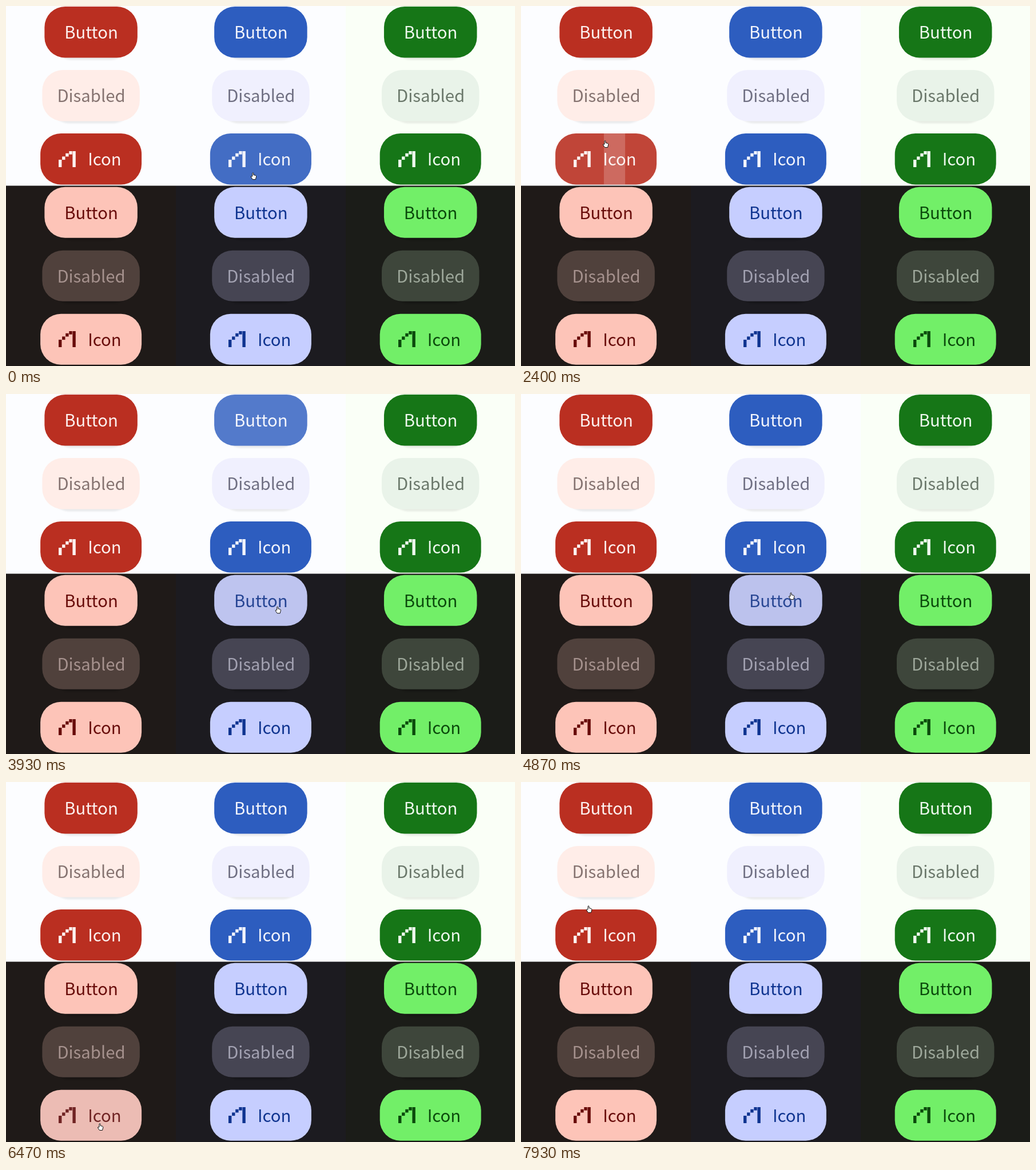
An HTML page that plays this animation: 890x630 px, repeating every 8000 ms.

```html
<!DOCTYPE html>
<html lang="en">
<head>
<meta charset="utf-8">
<title>Button states</title>
<style>
html, body { margin: 0; width: 100%; height: 100%; overflow: hidden; background: #1c1b20; }
svg { display: block; width: 890px; height: 630px; }
text { font: 29.3px "Noto Sans CJK SC", "Noto Sans CJK JP", "Noto Sans CJK", "Noto Sans", sans-serif; }
</style>
</head>
<body>
<svg id="stage" viewBox="0 0 890 630">
  <defs>
    <filter id="soft" x="-10%" y="-10%" width="120%" height="130%"><feGaussianBlur stdDeviation="1.5"/></filter>
    <g id="steps"></g>
  </defs>
  <g id="scene"></g>
  <g id="cursor" stroke-linejoin="round">
    <path id="arrow" fill="#fff" stroke="#111" d="M.5 .5V16.500L4.200 13L7 19.500L9.700 18.300L7 12H11.700Z"/>
    <path id="hand" fill="#fff" stroke="#111" d="M-1 7V1.500Q0 -.2 1 1.500V4.500L5 5.500Q6 6 5.700 8L4.500 12.500H-.5L-3.500 8Q-3.500 6.200 -2 7Z"/>
  </g>
</svg>
<script>
const NS = 'http://www.w3.org/2000/svg';
const LOOP = 8000, STEP = 1000 / 15, TRAVEL = 200, GROW = 300, FADE = 250;
const COL = 296.8, ROW = 111, CENTER = 148.6, RADIUS = 36;
const $ = id => document.getElementById(id);
const scene = $('scene');

function add(parent, tag, attrs, text) {
  const el = document.createElementNS(NS, tag);
  for (const k in attrs) el.setAttribute(k, attrs[k]);
  if (text) el.textContent = text;
  parent.appendChild(el);
  return el;
}

const theme = (y, h, overlay, hover, ripple, shade, cols) => ({ y, h, overlay, hover, ripple, shade, cols });
const colors = (bg, fill, ink, off, offInk) => ({ bg, fill, ink, off, offInk });
const themes = [
  theme(0, 89.5, '#eee', 0.115, '#fff', 0.07, [
    colors('#fcfdff', '#ba2f21', '#fdf1ef', '#ffede8', '#857370'),
    colors('#fcfdff', '#2d5dbf', '#f2f4fc', '#f0f0fe', '#6f6f82'),
    colors('#fafff7', '#167617', '#eef8ee', '#e9f3e9', '#6a776a')]),
  theme(315.8, 88.9, '#9696a0', 0.17, '#9696a0', 0.2, [
    colors('#1f1a18', '#fdc4b8', '#680c0a', '#50413c', '#a6928e'),
    colors('#1c1b20', '#c6ceff', '#0f3490', '#464553', '#a3a2b2'),
    colors('#1b1c18', '#72ef68', '#0b4a0c', '#3e463b', '#9ea89b')])
];
const widths = { Button: 162.5, Disabled: 170.5, Icon: 177 };
const buttons = [];

// Small staircase: tall first and last bars, short treads between
for (let i = 0; i < 5; i++) {
  const height = i === 0 ? 13 : i === 4 ? 28 : 5.7;
  add($('steps'), 'rect', { x: 92 + 6.1 * i, y: Math.max(254, 269 - 5.6 * i), width: 5.4, height });
}

function drawButton(style, col, i, name, row) {
  const off = name === 'Disabled', ink = off ? col.offInk : col.ink;
  const width = widths[name], height = style.h;
  const x = CENTER - width / 2 + i * COL, y = 1 + row * ROW + style.y;
  const shape = { x, y, width, height, rx: RADIUS };
  add(scene, 'rect', { ...shape, x: x + 12, y: y + 4, width: width - 24,
    fill: '#000', opacity: style.shade, filter: 'url(#soft)' });
  add(scene, 'rect', { ...shape, fill: off ? col.off : col.fill });

  const icon = name === 'Icon';
  if (icon) add(scene, 'use', { href: '#steps', fill: ink,
    transform: `translate(${Math.round(i * COL)} ${Math.floor(style.y)})` });
  add(scene, 'text', { x: (icon ? 172.4 : 149) + i * COL, y: y + 56.3, fill: ink, 'text-anchor': 'middle' }, name);
  if (off) return;

  const id = 'clip' + buttons.length;
  add(add(scene, 'clipPath', { id }), 'rect', shape);
  const hover = add(scene, 'rect', { ...shape, fill: style.overlay, opacity: 0 });
  const layer = add(scene, 'g', { 'clip-path': `url(#${id})` });
  const ripple = add(layer, 'rect', { y, height, fill: style.ripple, opacity: 0 });
  buttons.push({ x, y, w: width, h: height, hover, ripple, level: style.hover });
}

for (const style of themes) {
  style.cols.forEach((col, i) => add(scene, 'rect', {
    x: i * 297, y: style.y && 314.5, width: 297, height: 316, fill: col.bg }));
  style.cols.forEach((col, i) =>
    Object.keys(widths).forEach((name, row) => drawButton(style, col, i, name, row)));
}

// Pointer stops: arrival time, place, and how far it sways until the next stop
const stop = (t, x, y, sway = 0) => ({ t, x, y, sway });
const stops = [
  stop(0, 432, 291), stop(67, 175, 411), stop(267, 160, 118), stop(533, 18, 240),
  stop(800, 109, 167), stop(1133, 136, 149), stop(1533, 153, 223), stop(1600, 186, 268),
  stop(1933, 97, 234), stop(2347, 163.5, 250), stop(2400, 147, 235), stop(2667, 755, 150),
  stop(2867, 627, 8), stop(3000, 450, 45, 40), stop(3800, 480, 60), stop(3866, 477, 385),
  stop(3933, 475, 371, 40), stop(4867, 472, 347), stop(5133, 440, 560), stop(5400, 470, 590),
  stop(5700, 400, 550), stop(6000, 56, 530), stop(6200, 164, 597), stop(6470, 164, 597, 40),
  stop(7267, 150, 580), stop(7500, 140, 470), stop(7933, 118, 216), stop(LOOP, 118, 216)
];
const presses = [2347, 3610, 4360, 5180, 6500, 6900];
const smooth = k => k * k * (3 - 2 * k);

function pointer(t) {
  const n = stops.findIndex(s => s.t > t);
  const a = stops[n - 1], b = stops[n];
  const span = b.t - a.t, travel = Math.min(span, TRAVEL);
  const k = smooth(Math.max(0, 1 - (b.t - t) / travel));
  const turn = 2 * Math.PI * (t - a.t) / span;
  return [
    a.x + (b.x - a.x) * k - a.sway * Math.sin(turn),
    a.y + (b.y - a.y) * k + a.sway / 3 * Math.sin(2 * turn)
  ];
}

const hit = ([x, y]) => buttons.find(b => x >= b.x && x <= b.x + b.w && y >= b.y && y <= b.y + b.h);

const clicks = presses.map(t => {
  const p = pointer(t);
  return { t, x: p[0], button: hit(p) };
});

function render(time) {
  const step = Math.floor((time % LOOP + 5) / STEP);
  const t = Math.min(step * STEP + 1, LOOP - 1);
  const pos = pointer(t);
  // The cursor shape and hover trail the pointer by one step
  const before = hit(pointer(Math.max(0, t - STEP))), now = hit(pos);

  for (const b of buttons) {
    b.hover.setAttribute('opacity', b === before && b === now ? b.level : 0);
    b.ripple.setAttribute('opacity', 0);
  }
  for (const { t: start, x, button: b } of clicks) {
    const age = t - start;
    if (!b || age < 0 || age > GROW + FADE) continue;
    const reach = Math.max(x - b.x, b.x + b.w - x) * Math.min(1, age / GROW);
    b.ripple.setAttribute('x', x - reach);
    b.ripple.setAttribute('width', reach * 2);
    b.ripple.setAttribute('opacity', 0.2 * Math.min(1, (GROW + FADE - age) / FADE));
  }

  $('cursor').setAttribute('transform', `translate(${pos[0]} ${pos[1]})`);
  $('hand').setAttribute('display', before ? 'inline' : 'none');
  $('arrow').setAttribute('display', before ? 'none' : 'inline');
}

const begin = performance.now();
function frame() {
  render(performance.now() - begin);
  requestAnimationFrame(frame);
}
render(0);
requestAnimationFrame(frame);
</script>
</body>
</html>
```
